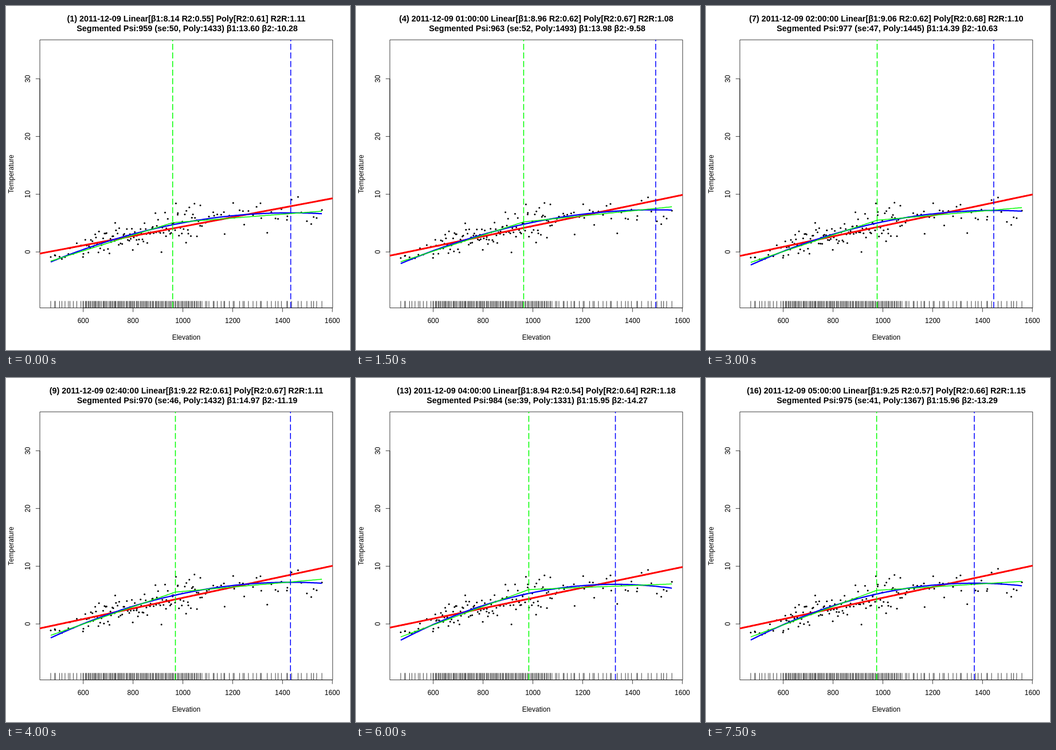
An HTML page for the animation above (8000 ms loop, 600 by 600 pixels).

```html
<!DOCTYPE html>
<html lang="en">
<head>
<meta charset="utf-8">
<title>Temperature by elevation</title>
<style>
  html, body { margin: 0; width: 100%; height: 100%; overflow: hidden; background: #fff; }
  svg { display: block; width: 600px; height: 600px; font: 12px "Liberation Sans", Arial, sans-serif; text-anchor: middle; }
  path { fill: none; }
  .title { font-weight: bold; font-size: 14.4px; }
</style>
</head>
<body>
<svg viewBox="0 0 600 600"></svg>
<script>
const STEP = 500, STEPS = 16;
const LEFT = 59.04, RIGHT = 569.76, TOP = 59.04, BOTTOM = 526.56;
const FIRST = 78, LAST = 551;          // extent of the stations, in px
const DEG = 10.07, PER_M = 0.4345;     // px per degree, px per metre
const px = e => 134.7 + (e - 600) * PER_M;
const py = t => 429 - t * DEG;
const pxSlope = perKm => perKm / 1000 * DEG / PER_M;

// Values quoted in the caption at key steps; all curves follow from them:
// step, linear β1, R2, poly R2, ratio, psi, se, poly vertex, segment β1, β2
const fits = [
  [0, 8.14, .55, .61, 1.11, 959, 50, 1433, 13.60, -10.28],
  [3, 8.96, .62, .67, 1.08, 963, 52, 1493, 13.98, -9.58],
  [6, 9.06, .62, .68, 1.10, 977, 47, 1445, 14.39, -10.63],
  [8, 9.22, .61, .67, 1.11, 970, 46, 1432, 14.97, -11.19],
  [10, 8.93, .52, .61, 1.17, 961, 42, 1342, 16.28, -13.94],
  [13, 8.94, .55, .65, 1.19, 995, 38, 1326, 15.79, -14.43],
  [15, 9.25, .57, .66, 1.15, 975, 41, 1367, 15.96, -13.29]
];

// The fitted lines turn about nearly fixed points as their slopes change
const linear = ([, slope]) => x => 395 - pxSlope(slope) * (x - 254);

function quadratic(f) {
  const line = linear(f), lo = 187, hi = 420;   // where curve and line cross
  const bow = pxSlope(f[1]) / (2 * px(f[7]) - lo - hi);
  return x => line(x) + bow * (x - lo) * (x - hi);
}

function segmented([, , , , , psi, , , b1, b2]) {
  const bend = px(psi);
  return x => 406.5 - pxSlope(b1) * (x - 200) - pxSlope(b2) * Math.max(0, x - bend);
}

function fitAt(step) {
  const n = Math.max(1, fits.findIndex(f => f[0] >= step));
  const a = fits[n - 1], b = fits[n], u = (step - a[0]) / (b[0] - a[0]);
  return a.map((v, i) => v + (b[i] - v) * u);
}

function noise(a, b = 0) {
  const s = Math.sin(a * 12.9898 + b * 78.233) * 43758.5453;
  return s - Math.floor(s);
}

// Stations: sparse in the valley, dense on the slope, thinning towards the top
function stationX(u) {
  if (u < 0.07) return FIRST + u / 0.07 * 56;
  if (u < 0.76) return 134 + (u - 0.07) / 0.69 * 201;
  return 335 + ((u - 0.76) / 0.24) ** 1.3 * (LAST - 335);
}

const COUNT = 160;
const meanCurve = quadratic(fitAt(8));
const stations = Array.from({ length: COUNT }, (_, i) => {
  const last = COUNT - 1, inner = i > 0 && i < last;
  const x = stationX((i + (inner ? noise(i) - 0.5 : 0)) / last);
  const spread = Math.min(26, 6 + (x - FIRST) * 0.2);
  const cold = x > 250 && noise(i, 5) < 0.13 ? 32 : -2;
  const offset = (noise(i, 2) + noise(i, 3) - 1) * spread * 1.25 + cold;
  return [x, meanCurve(x) + (x < 130 ? -5 : 0) + offset];
});

const path = (d, color, width, extra = "") =>
  `<path d="${d}" stroke="${color}" stroke-width="${width}" ${extra}/>`;
const text = (x, y, s, extra = "") => `<text x="${x}" y="${y}" ${extra}>${s}</text>`;
const turned = (x, y, s) => text(x, y, s, `transform="rotate(-90 ${x} ${y})"`);
const thin = d => path(d, "#000", 0.75);

function plot(curve, from, to, color, width) {
  const points = [];
  for (let x = from; x < to; x += 2) points.push(`${x} ${curve(x)}`);
  points.push(`${to} ${curve(to)}`);
  return path("M" + points.join("L"), color, width, 'stroke-linejoin="round"');
}

const vertical = (x, color) =>
  path(`M${x} ${BOTTOM}V${TOP}`, color, 1.5, 'stroke-dasharray="10.5 4.5"');

function frame() {
  let out = thin(`M${LEFT} ${TOP}H${RIGHT}V${BOTTOM}H${LEFT}Z`);
  out += thin(`M${px(600)} ${BOTTOM}H${px(1600)}`) + thin(`M${LEFT} ${py(0)}V${py(30)}`);
  for (let e = 600; e <= 1600; e += 200)
    out += thin(`M${px(e)} ${BOTTOM}v7.2`) + text(px(e), 553, e);
  for (let t = 0; t <= 30; t += 10)
    out += thin(`M${LEFT} ${py(t)}h-7.2`) + turned(42, py(t), t);
  out += text(314.4, 582, "Elevation") + turned(12.5, 293, "Temperature");
  return out + thin(stations.map(([x]) => `M${x} ${BOTTOM}v-12`).join(""));
}

function dots(step) {
  return stations.map(([x, y], i) => {
    const cooling = Math.min(1, Math.max(0, (190 - x) / 60)) * (step - 8) * 0.5;
    const drift = (noise(i + 1, step + 1) - 0.5) * 3;
    return `<circle cx="${x}" cy="${y + cooling + drift}" r="1.5"/>`;
  }).join("");
}

function curves(f) {
  return plot(linear(f), LEFT, RIGHT, "#f00", 3)
    + plot(quadratic(f), FIRST, LAST, "#00f", 2.25)
    + plot(segmented(f), FIRST, LAST, "#0f0", 1.5)
    + vertical(px(f[5]), "#0f0") + vertical(px(f[7]), "#00f");
}

function titles(step, f) {
  const [, slope, r2, polyR2, ratio, psi, se, vertex, b1, b2] = f;
  const two = n => String(n).padStart(2, "0");
  const clock = step ? ` ${two(Math.floor(step / 3))}:${two(step % 3 * 20)}:00` : "";
  const line1 = `(${step + 1}) 2011-12-09${clock} Linear[β1:${slope.toFixed(2)} R2:${r2.toFixed(2)}]`
    + ` Poly[R2:${polyR2.toFixed(2)}] R2R:${ratio.toFixed(2)}`;
  const line2 = `Segmented Psi:${psi.toFixed(0)} (se:${se.toFixed(0)}, Poly:${vertex.toFixed(0)})`
    + ` β1:${b1.toFixed(2)} β2:${b2.toFixed(2)}`;
  return text(314.4, 27, line1, 'class="title"') + text(316, 44, line2, 'class="title"');
}

const svg = document.querySelector("svg");
const axes = frame();
let shown = -1;
function draw(now) {
  const step = Math.floor(now / STEP) % STEPS;
  if (step !== shown) {
    const f = fitAt(step);
    svg.innerHTML = axes + dots(step) + curves(f) + titles(step, f);
    shown = step;
  }
  requestAnimationFrame(draw);
}
draw(performance.now());
</script>
</body>
</html>
```
